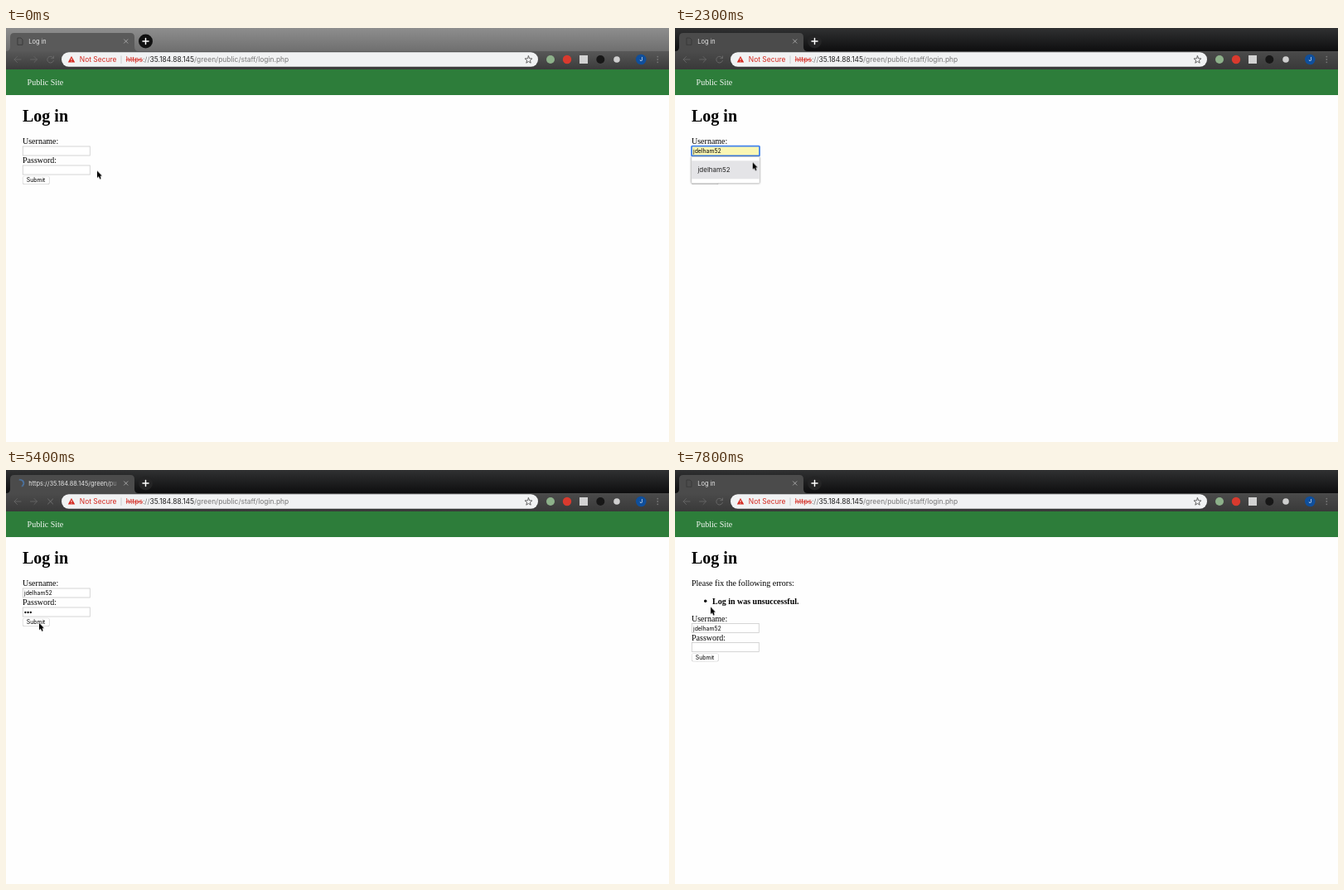
Animation of 800 by 500 pixels, one loop 8 s. Source, as an HTML page:

```html
<!DOCTYPE html>
<html lang="en">
<head>
<meta charset="utf-8">
<title>Log in</title>
<style>
html, body { margin: 0; width: 100%; height: 100%; overflow: hidden; background: #fefefe; }
svg { display: block; width: 800px; height: 500px; }
text { font-family: Inter, Roboto, sans-serif; white-space: pre; }
.page text { font: 10px "Liberation Serif", serif; fill: #000; }
.page .title { font-size: 20px; font-weight: bold; }
.page .bold { font-weight: bold; }
.page .ui { font: 6.875px Inter, sans-serif; }
.page .item { font: 8px Inter, sans-serif; fill: #222; }
.tab { font-size: 7.4px; fill: #e4e4e4; }
.url { font-size: 8.45px; }
.box { fill: #fff; stroke: #cbcbcb; stroke-width: .8; }
.ring { fill: none; stroke: #4384ee; stroke-width: 1.8; }
.line { fill: none; stroke-linecap: round; stroke-linejoin: round; }
.menu { fill: #fff; stroke: #c4c4c4; stroke-width: .5; filter: drop-shadow(0 .8px .8px #0006); }

/* Every timeline is 8 s long: 1.25% is one tenth of a second. */
.step { visibility: hidden; animation: 8s step-end infinite; }
.idle { animation-name: idle; }
.user-ring { animation-name: userRing; }
.user-caret { animation-name: userCaret; }
.full-menu { animation-name: fullMenu; }
.typed { animation-name: typed; }
.short-menu { animation-name: shortMenu; }
.preview { animation-name: preview; }
.value { animation-name: value; }
.pass-ring { animation-name: passRing; }
.pass-caret { animation-name: passCaret; }
.dot1 { animation-name: dot1; }
.dot2 { animation-name: dot2; }
.dot3 { animation-name: dot3; }
.loading { animation-name: loading; }
.ready { visibility: visible; animation-name: ready; }
.errors { animation-name: errors; }
.arrow { animation-name: arrow; }
.beam { animation-name: beam; }
.form { animation: form 8s step-end infinite; }
.status { opacity: 0; animation: status 8s step-end infinite; }
.mouse { animation: mouse 8s linear infinite; }
.spin { transform-origin: 17px 16px; animation: spin 1s steps(10) infinite; }

@keyframes idle { 0% { visibility: visible } 5%, to { visibility: hidden } }
@keyframes userRing { 6.25% { visibility: visible } 33.75%, to { visibility: hidden } }
@keyframes userCaret {
  6.25%, 18.75% { visibility: visible }
  12.5%, 20%, to { visibility: hidden }
}
@keyframes fullMenu { 6.25% { visibility: visible } 20%, to { visibility: hidden } }
@keyframes typed { 20% { visibility: visible } 26.25%, to { visibility: hidden } }
@keyframes shortMenu { 20% { visibility: visible } 31.25%, to { visibility: hidden } }
@keyframes preview { 26.25% { visibility: visible } 31.25%, to { visibility: hidden } }
@keyframes value { 26.25%, to { visibility: visible } }
@keyframes passRing { 41.25% { visibility: visible } 66.25%, to { visibility: hidden } }
@keyframes passCaret {
  41.25% { visibility: visible; transform: none }
  47.5% { visibility: visible; transform: translateX(3px) }
  51.25% { visibility: visible; transform: translateX(6px) }
  55% { visibility: visible; transform: translateX(9.2px) }
  63.75%, to { visibility: hidden }
}
@keyframes dot1 { 47.5% { visibility: visible } 77.5%, to { visibility: hidden } }
@keyframes dot2 { 51.25% { visibility: visible } 77.5%, to { visibility: hidden } }
@keyframes dot3 { 55% { visibility: visible } 77.5%, to { visibility: hidden } }
@keyframes loading { 67.5% { visibility: visible } 77.5%, to { visibility: hidden } }
@keyframes ready { 67.5% { visibility: hidden } 77.5%, to { visibility: visible } }
@keyframes errors { 77.5%, to { visibility: visible } }
@keyframes form { 0% { transform: none } 77.5%, to { transform: translateY(42.5px) } }
@keyframes status {
  0% { opacity: 0 }
  68.75% { opacity: 1 }
  80% { opacity: .66 }
  81.25% { opacity: .33 }
  82.5%, to { opacity: 0 }
}
@keyframes arrow {
  0%, 25%, 57.5%, to { visibility: visible }
  6.25%, 41.25% { visibility: hidden }
}
@keyframes beam {
  6.25%, 41.25% { visibility: visible }
  20%, 47.5%, to { visibility: hidden }
}
@keyframes mouse {
  0% { transform: translate(110px, 172.5px); animation-timing-function: steps(6) }
  7.5% { transform: translate(83.7px, 151.5px); animation-timing-function: step-end }
  25% { transform: translate(86px, 156px); animation-timing-function: steps(3) }
  28.75% { transform: translate(93.7px, 162.3px); animation-timing-function: steps(5) }
  35%, 37.5% { transform: translate(101px, 175px); animation-timing-function: step-end }
  38.75% { transform: translate(99px, 173.5px); animation-timing-function: steps(3) }
  42.5% { transform: translate(88px, 171.5px); animation-timing-function: step-end }
  57.5% { transform: translate(80.2px, 180px); animation-timing-function: steps(4) }
  62.5% { transform: translate(58px, 190px); animation-timing-function: steps(4) }
  67.5%, 91.25% { transform: translate(40px, 184.7px); animation-timing-function: step-end }
  92.5% { transform: translate(45px, 183px); animation-timing-function: steps(2) }
  95% { transform: translate(49px, 174px); animation-timing-function: steps(2) }
  97.5%, to { transform: translate(43px, 165.5px) }
}
@keyframes spin { to { transform: rotate(360deg) } }
</style>
</head>
<body>
<svg viewBox="0 0 800 500">
  <defs>
    <linearGradient id="strip" x2="0" y2="1"><stop stop-color="#303132"/><stop offset="1" stop-color="#0e0e0f"/></linearGradient>
    <linearGradient id="bar" x2="0" y2="1"><stop stop-color="#4b4b4b"/><stop offset="1" stop-color="#393939"/></linearGradient>
    <linearGradient id="idleStrip" x2="0" y2="1"><stop stop-color="#8e8e8e"/><stop offset="1" stop-color="#6f6f6f"/></linearGradient>
    <linearGradient id="idleBar" x2="0" y2="1"><stop stop-color="#585858"/><stop offset="1" stop-color="#3b3b3b"/></linearGradient>
    <linearGradient id="fade" gradientUnits="userSpaceOnUse" x1="122" x2="138"><stop stop-color="#e4e4e4"/><stop offset="1" stop-color="#e4e4e4" stop-opacity="0"/></linearGradient>
    <path id="tab" d="M0 28Q5 28 5 23V11Q5 6 10 6H150Q155 6 155 11V23Q155 28 160 28Z"/>
    <rect id="field" class="box" x="20.3" y="143" width="81" height="11"/>
  </defs>

  <rect width="800" height="500" fill="#fefefe"/>

  <!-- browser window -->
  <rect width="800" height="28" fill="url(#strip)"/>
  <use href="#tab" fill="#4b4b4b"/>
  <rect y="28" width="800" height="22" fill="url(#bar)"/>
  <circle cx="168.5" cy="16" r="8.5" fill="#242425"/>
  <g class="step idle">
    <rect width="800" height="28" fill="url(#idleStrip)"/>
    <use href="#tab" fill="#5a5a5a"/>
    <rect y="28" width="800" height="22" fill="url(#idleBar)"/>
    <circle cx="168.5" cy="16" r="8.5" fill="#111"/>
  </g>
  <path class="line" d="M168.5 12.5V19.5M165 16H172" stroke="#fff" stroke-width="1.5"/>
  <path class="line" d="M142.5 13.8L146.9 18.2M146.9 13.8L142.5 18.2" stroke="#aaa" stroke-width=".9"/>
  <g class="step ready">
    <path class="line" d="M14.3 12H18L20 14V20.3H14.3Z" stroke="#393939" stroke-width=".9"/>
    <text class="tab" x="27.3" y="18.7">Log in</text>
    <path class="line" d="M57 36A3.9 3.9 0 1 0 57.4 39.5M57.5 34V36.7H54.8" stroke="#686868"/>
  </g>
  <g class="step loading">
    <path class="line spin" d="M17 11.8A4.2 4.2 0 0 0 15 19.7" stroke="#4a8fe0" stroke-width="1.1"/>
    <text class="tab" x="27.3" y="18.7" style="fill:url(#fade)">https://35.184.88.145/green/pu</text>
    <path class="line" d="M50.6 35L56.6 41M56.6 35L50.6 41" stroke="#707070"/>
  </g>
  <path class="line" d="M18 38H10M13.5 34.5L10 38L13.5 41.5M29.5 38H37.5M34 34.5L37.5 38L34 41.5" stroke="#626262"/>

  <rect x="67" y="29.3" width="575" height="17.4" rx="8.7" fill="#f1f2f3"/>
  <path d="M79 34L83.2 41.6H74.8Z" fill="#d4281f"/>
  <path d="M79 36.6V39M79 39.8V40.7" stroke="#fff" stroke-width=".9"/>
  <text class="url" x="88.8" y="41.2" fill="#d4281f">Not Secure</text>
  <path d="M139 33.5V43" stroke="#c3c4c6" stroke-width=".8"/>
  <text class="url" x="144.8" y="41.2" fill="#777"><tspan fill="#d4281f" text-decoration="line-through">https</tspan>://<tspan fill="#222">35.184.88.145</tspan>/green/public/staff/login.php</text>
  <path class="line" d="M630.5 33.8L631.7 36.8L634.9 37L632.4 39.1L633.2 42.2L630.5 40.5L627.8 42.2L628.6 39.1L626.1 37L629.3 36.8Z" stroke="#555" stroke-width=".9"/>

  <circle cx="657" cy="38" r="5" fill="#8db18a"/>
  <circle cx="677" cy="38" r="5.2" fill="#d93a2e"/>
  <rect x="692" y="33" width="10" height="10" fill="#d2d2d2"/>
  <circle cx="717.3" cy="38" r="5" fill="#171717"/>
  <circle cx="737" cy="38" r="3.8" fill="#cfcfcf"/>
  <circle cx="766.3" cy="38" r="6.3" fill="#0f4f9c"/>
  <text x="766.3" y="40.4" font-size="6.6" text-anchor="middle" fill="#fff">J</text>
  <g fill="#777"><circle cx="786.3" cy="34.7" r=".9"/><circle cx="786.3" cy="38" r=".9"/><circle cx="786.3" cy="41.3" r=".9"/></g>

  <!-- web page -->
  <g class="page">
    <rect y="50" width="800" height="31" fill="#2d7d3a"/>
    <text x="25.6" y="69.4" style="fill:#f3f7f3">Public Site</text>
    <text class="title" x="20" y="112.6">Log in</text>

    <g class="step errors">
      <text x="20" y="140.2">Please fix the following errors:</text>
      <circle cx="36.7" cy="158.3" r="1.7"/>
      <text class="bold" x="45" y="161.5">Log in was unsuccessful.</text>
    </g>

    <g class="form">
      <text x="20" y="140.2">Username:</text>
      <use href="#field"/>
      <rect class="step preview" x="20.3" y="143" width="81" height="11" fill="#faf7b4"/>
      <text class="ui step value" x="22" y="151">jdelham52</text>
      <g class="step typed">
        <text class="ui" x="22" y="151">j</text>
        <path d="M24.3 144.8V152.4" stroke="#000" stroke-width=".7"/>
      </g>
      <path class="step user-caret" d="M22.4 144.8V152.4" stroke="#000" stroke-width=".7"/>
      <rect class="ring step user-ring" x="20" y="142.6" width="82" height="11.8" rx="1"/>

      <text x="20" y="163.2">Password:</text>
      <use href="#field" y="23"/>
      <circle class="step dot1" cx="23.4" cy="172" r="1.15"/>
      <circle class="step dot2" cx="26.6" cy="172" r="1.15"/>
      <circle class="step dot3" cx="29.8" cy="172" r="1.15"/>
      <path class="step pass-caret" d="M22.4 167.8V175.4" stroke="#000" stroke-width=".7"/>
      <rect class="ring step pass-ring" x="20" y="165.6" width="82" height="11.8" rx="1"/>

      <rect x="20" y="179.3" width="32.6" height="9.7" rx="2" fill="#bdbdbd"/>
      <rect x="20.3" y="179" width="32" height="9.4" rx="1.8" fill="#fff" stroke="#dedede" stroke-width=".5"/>
      <text class="ui" x="24.8" y="186.4">Submit</text>
    </g>

    <g class="step full-menu">
      <rect class="menu" x="19.8" y="155.6" width="82.2" height="77" rx="1"/>
      <text class="item" x="27.4" y="174.3">qdensor</text>
      <text class="item" x="27.4" y="196.8">jdelham52</text>
      <text class="item" x="27.4" y="219.3">uvo</text>
    </g>
    <g class="step short-menu">
      <rect class="menu" x="19.8" y="155.6" width="82.2" height="32" rx="1"/>
      <rect class="step preview" x="20" y="160.3" width="81.8" height="22" fill="#e4e4e7"/>
      <text class="item" x="27.4" y="174.3">jdelham52</text>
    </g>
  </g>

  <g class="status">
    <path d="M0 487H263.5Q265.5 487 265.5 489V500H0Z" fill="#151515"/>
    <text x="2" y="496.2" font-size="7.4" fill="#969696">Waiting for 35.184.88.145...</text>
  </g>

  <g class="mouse">
    <path class="step arrow" d="M0 0V8.5L1.9 6.8L3.3 9.9L4.8 9.2L3.5 6.2H6Z" stroke="#fff" stroke-width=".8" paint-order="stroke"/>
    <path class="line step beam" d="M-2 -4.3Q0 -4.3 0 -3Q0 -4.3 2 -4.3M0 -3V3M-2 4.3Q0 4.3 0 3Q0 4.3 2 4.3M-1 1.3H1" stroke="#111" stroke-width=".9"/>
  </g>
</svg>
</body>
</html>
```
